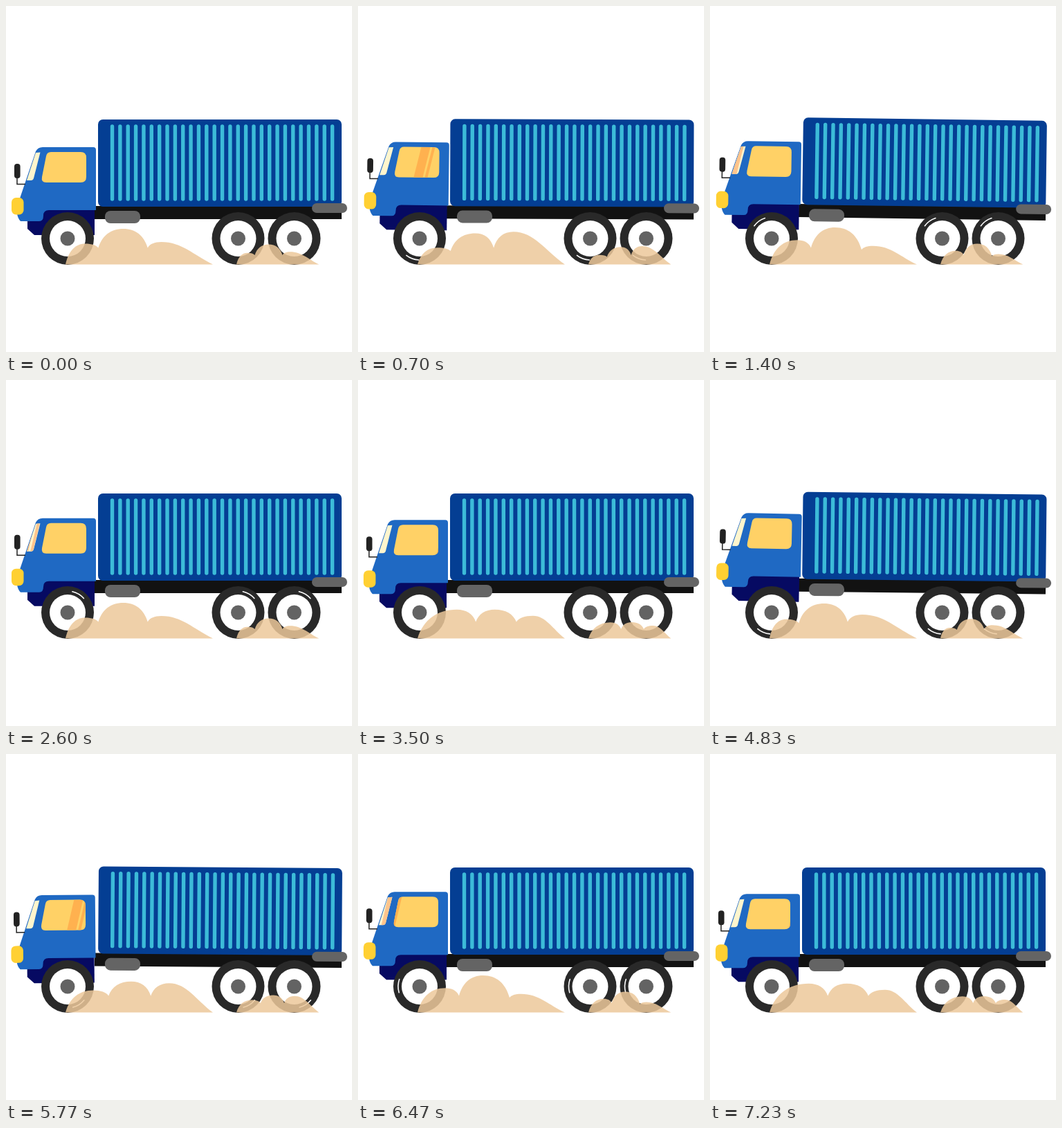
An HTML page for the animation above (7260 ms loop, 500 px wide and 500 px high).

```html
<!DOCTYPE html>
<html lang="en">
<head>
<meta charset="utf-8">
<title>Truck</title>
<style>
  html, body { margin: 0; width: 100%; height: 100%; overflow: hidden; background: #fff; }
  svg { display: block; width: 100%; height: 100%; }
</style>
</head>
<body>
<svg viewBox="0 0 500 500">
  <defs>
    <path id="sidePane" d="M65 211H108Q116 211 116 219V247Q116 255 108 255H58Q50.500 255 52 247L58 217Q59 211 65 211Z"/>
    <path id="frontPane" d="M43 212L49.500 211.500L40 249Q39 252 36 252H30Z"/>
    <clipPath id="sideClip"><use href="#sidePane"/></clipPath>
    <clipPath id="frontClip"><use href="#frontPane"/></clipPath>
    <g id="shine"><path d="M-11 256L0 210H13L2 256Z"/><path d="M5 256L16 210H20L9 256Z"/></g>
    <g id="wheel">
      <circle r="38" fill="#292929"/>
      <circle r="26" fill="#fff"/>
      <circle r="10.500" fill="#636363"/>
    </g>
    <path id="glint" fill="none" stroke="#fff" stroke-width="1.6" stroke-linecap="round"/>
    <path id="dustShape" fill="#edc89b" fill-opacity=".85"/>
  </defs>

  <g id="trailer">
    <rect x="128" y="289" width="357" height="19" fill="#121212"/>
    <rect x="133" y="164" width="352" height="126" rx="7" fill="#043e93"/>
    <path id="ribs" stroke="#3cbbd8" stroke-width="5.4" stroke-linecap="round"/>
    <rect x="143" y="296" width="51" height="18" rx="8" fill="#646464"/>
    <rect x="442" y="285" width="51" height="14" rx="7" fill="#646464"/>
  </g>

  <g id="cab">
    <path d="M31 290V322L41 331H128V290Z" fill="#060a62"/>
    <path d="M53 204H126Q130 204 130 208V295H62Q54 295 54 303Q54 311 48 311H21Q17 307 16 300V290L22 272L43 210Q46 204 53 204Z" fill="#1f69c3"/>
    <use href="#sidePane" fill="#ffd166"/>
    <use href="#frontPane" fill="#fff5cd"/>
    <g clip-path="url(#sideClip)"><use class="shine" href="#shine" fill="#ffb14f"/></g>
    <g clip-path="url(#frontClip)"><use class="shine" href="#shine" fill="#ffc48c"/></g>
    <path d="M16 247V257.500H28" fill="none" stroke="#222" stroke-width="1.5"/>
    <rect x="12" y="228" width="8.600" height="21" rx="4" fill="#222"/>
    <rect x="8" y="277" width="17.500" height="24.500" rx="6.500" fill="#ffd033"/>
  </g>

  <g id="wheels"></g>
  <use href="#dustShape"/>
  <use href="#dustShape" transform="translate(333 373.500) scale(.56) translate(-86 -373.500)"/>
</svg>

<script>
const LOOP = 7260;
const CYCLE = 53;        // steps per bump in the road
const SWEEPS = 3;        // dust and shine passes per bump
const POSES = 8;         // held dust drawings per pass
const GROUND = 373.5;
const find = id => document.getElementById(id);

// Half sine wave between two steps, zero outside them
const hump = (step, from, to) =>
  step < from || step > to ? 0 : Math.sin(Math.PI * (step - from) / (to - from));

// Puffs drift right, speeding up, while big and small ones alternate
function dustPuffs(pose) {
  const shifted = (pose + 1) % POSES, half = POSES / 2;
  const drift = ((shifted % half) / half) ** 1.8;
  const offset = Math.floor(shifted / half);
  return [0, 1, 2].map(i => {
    const big = (i + offset) % 2 === 1;
    const x = 110 + 55 * (i + drift);
    const height = (big ? 54 : 45) * Math.cos(Math.PI * (x - (big ? 190 : 172)) / 215);
    return { x, height };
  });
}

function dustPath(puffs) {
  const left = 86, right = 299;
  let x = left, y = GROUND, d = `M${x} ${y}`;
  const curve = (nx, ny, startX, startY, endX, endY) => {
    const dx = nx - x, dy = ny - y;
    d += `C${x + dx * startX} ${y + dy * startY} ${nx - dx * endX} ${ny - dy * endY} ${nx} ${ny}`;
    x = nx; y = ny;
  };
  puffs.forEach((puff, i) => {
    curve(puff.x, GROUND - puff.height, .15, .65, .5, 0);
    const next = puffs[i + 1];
    if (!next) return;
    // the valley sits nearer to the lower puff
    const valleyX = (puff.x + next.x) / 2 + (puff.height - next.height) * .4;
    const valley = Math.min(24, .8 * Math.min(puff.height, next.height));
    curve(valleyX, GROUND - valley, .5, 0, .15, .65);
  });
  curve(right, GROUND, .4, 0, .38, .42);
  return d + 'Z';
}

function arc(radius, degrees) {
  const half = degrees * Math.PI / 360;
  const x = radius * Math.cos(half), y = radius * Math.sin(half);
  return `M${x} ${-y}A${radius} ${radius} 0 0 1 ${x} ${y}`;
}

find('ribs').setAttribute('d',
  Array.from({ length: 29 }, (_, i) => `M${153.5 + i * 11.36} 174V279`).join(''));
find('glint').setAttribute('d', arc(31, 36));
find('wheels').innerHTML = [89, 335.5, 416.5].map(x =>
  `<g transform="translate(${x} 336)"><use href="#wheel"/><use class="glint" href="#glint"/></g>`).join('');

const glints = document.querySelectorAll('.glint');
const shines = document.querySelectorAll('.shine');

function draw(ms) {
  // 70 ms steps shown on a 30 fps clock
  const tick = Math.floor(ms * .03 + .15);
  const step = Math.floor((tick + .001) / 2.1);
  const phase = step % CYCLE;
  const sweep = step * SWEEPS % CYCLE / CYCLE;

  const jolt = hump(phase, 2, 29) ** 2;
  const lift = 10.3 * jolt + 4.8 * hump(phase, 28, 53);
  const cabTilt = 1.1 * jolt - .5 * hump(phase, 23, 35);
  const trailerTilt = .8 * hump(phase, 5, 37) ** 2;
  find('cab').setAttribute('transform', `translate(0 ${-lift}) rotate(${cabTilt} 130 350)`);
  find('trailer').setAttribute('transform', `rotate(${trailerTilt} 345 305)`);

  find('dustShape').setAttribute('d', dustPath(dustPuffs(Math.floor(sweep * POSES))));
  shines.forEach(el => el.setAttribute('transform', `translate(${17 + sweep * 129} 0)`));

  const lit = phase >= 10 && phase <= 44;
  glints.forEach(el => {
    el.setAttribute('transform', `rotate(${-14 - 59.6 * phase})`);
    el.setAttribute('opacity', lit ? 1 : 0);
  });
}

const start = performance.now();
function play() {
  draw((performance.now() - start) % LOOP);
  requestAnimationFrame(play);
}
play();
</script>
</body>
</html>
```
